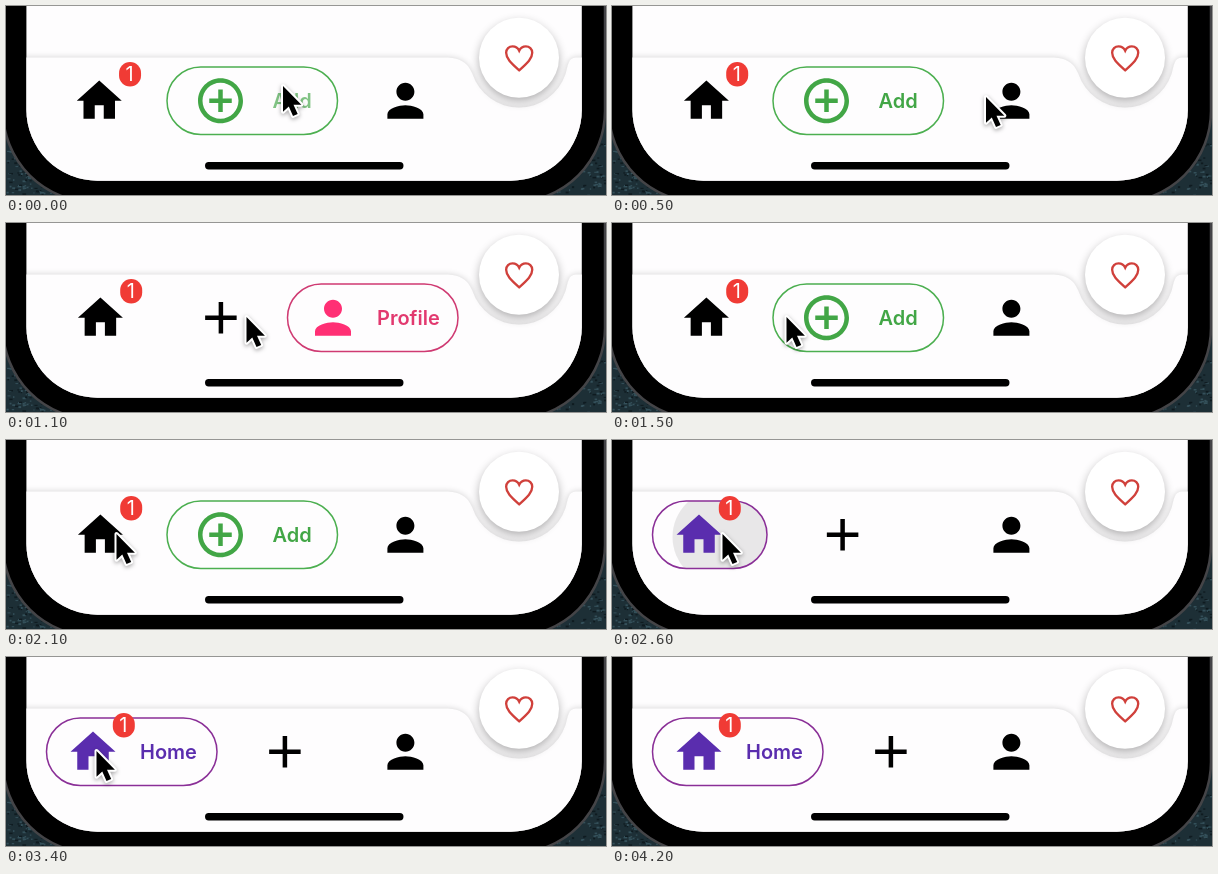
Recreate the animation shown at these times as an HTML page with a canvas. Size 600 px wide and 189 px high, loop 4300 ms.

```html
<!DOCTYPE html>
<html lang="en">
<head>
<meta charset="utf-8">
<title>Bottom navigation</title>
<style>
  html, body { margin: 0; width: 100%; height: 100%; overflow: hidden; background: #000; }
  canvas { display: block; width: 600px; height: 189px; }
</style>
</head>
<body>
<canvas id="stage"></canvas>
<script>
const W = 600, H = 189, LOOP = 4300, STEP = 100;
const canvas = document.getElementById('stage');
const ctx = canvas.getContext('2d');
const dpr = window.devicePixelRatio || 1;
canvas.width = W * dpr;
canvas.height = H * dpr;

// Icons on a 24 unit grid
const icons = {
  home: new Path2D('M10 20v-6h4v6h5v-8h3L12 3 2 12h3v8z'),
  plus: new Path2D('M19 13h-6v6h-2v-6H5v-2h6V5h2v6h6v2z'),
  plusRing: new Path2D('M13 7h-2v4H7v2h4v4h2v-4h4v-2h-4V7zm-1-5C6.48 2 2 6.48 2 12s4.48 10 10 10 10-4.48 10-10S17.52 2 12 2zm0 18c-4.41 0-8-3.59-8-8s3.59-8 8-8 8 3.59 8 8-3.59 8-8 8z'),
  person: new Path2D('M12 12c2.21 0 4-1.79 4-4s-1.79-4-4-4-4 1.79-4 4 1.79 4 4 4zm0 2c-2.67 0-8 1.34-8 4v2h16v-2c0-2.66-5.33-4-8-4z'),
  heart: new Path2D('M12 20.5C6 15.2 3 12.2 3 8.4C3 5.8 5 4 7.4 4C9.4 4 11.1 5.1 12 7C12.9 5.1 14.6 4 16.6 4C19 4 21 5.8 21 8.4C21 12.2 18 15.2 12 20.5Z')
};
const arrow = new Path2D('M0 0V25.8L5.8 20.5L10 30L14.7 28L10.5 18.7H18.4Z');
const boxPath = (x, y, w, h, r) => {
  const p = new Path2D();
  p.roundRect(x, y, w, h, r);
  return p;
};
const screenShape = boxPath(20.4, -200, 555.4, 374.7, 71);
const phoneShape = boxPath(-3, -200, 602, 396, 91);
const barShape = new Path2D('M10 51.5H438C455 51.5 462 57 466.5 68A49 49 0 0 0 559.5 68C562 60 562 51.5 570 51.5H582V200H10Z');

const MID = 94.8, LEFT = 40, NARROW = 107.5, WIDE = 171.5, GAP = 13, REST = 54.4;
const tabs = [
  { label: 'Home', icon: 'home', on: 'home', inset: 47, textAt: 94, line: '#8a2f97', tint: '#5a2dae' },
  { label: 'Add', icon: 'plus', on: 'plusRing', inset: 54, textAt: 106, line: '#4caf50', tint: '#42a646' },
  { label: 'Profile', icon: 'person', on: 'person', inset: 46, textAt: 90, line: '#cf3a72', tint: '#ff2f74', ink: '#e2396f' }
];
// Selections: time, tab, tap point
const taps = [
  { t: -300, tab: 1, x: 272 },
  { t: 650, tab: 2, x: 396 },
  { t: 1150, tab: 1, x: 238 },
  { t: 2450, tab: 0, x: 108 }
];
// Pointer stops: time, x, y
const pointer = [
  [0, 277, 80], [500, 374, 91], [650, 396, 94], [750, 396, 94],
  [1100, 240.5, 94], [1200, 236, 94], [1500, 174.5, 94], [1800, 110.5, 94],
  [2600, 110.5, 94], [3000, 90.5, 94], [3830, 90.5, 94], [3980, 40, 195]
];

const clamp = v => Math.max(0, Math.min(1, v));
const mix = (a, b, k) => a + (b - a) * k;
const smooth = v => v * v * (3 - 2 * v);

function onIconGrid(x, y, scale, paint) {
  ctx.save();
  ctx.translate(x, y);
  ctx.scale(scale, scale);
  ctx.translate(-12, -12);
  paint();
  ctx.restore();
}

function drawIcon(name, x, y, color) {
  onIconGrid(x, y, 2.25, () => {
    ctx.fillStyle = color;
    ctx.fill(icons[name], 'evenodd');
  });
}

function fillShadowed(path, fill, shadow, blur, dy) {
  ctx.save();
  ctx.shadowColor = shadow;
  ctx.shadowBlur = blur * dpr;
  ctx.shadowOffsetY = dy * dpr;
  ctx.fillStyle = fill;
  ctx.fill(path);
  ctx.restore();
}

function drawWallpaper() {
  ctx.fillStyle = '#1d2f36';
  ctx.fillRect(0, 0, W, H);
  let seed = 7;
  const rnd = () => (seed = seed * 16807 % 2147483647) / 2147483647;
  for (let i = 0; i < 260; i++) {
    const x = (rnd() * 100 + 550) % W;
    ctx.fillStyle = rnd() < .5 ? '#0f1b20' : '#34505a';
    ctx.fillRect(x, 135 + rnd() * 54, 1 + rnd() * 3, 1 + rnd());
  }
}

function drawPhone() {
  drawWallpaper();
  ctx.fillStyle = '#000';
  ctx.fill(phoneShape);
  ctx.strokeStyle = '#444447';
  ctx.lineWidth = 2.5;
  ctx.stroke(phoneShape);

  ctx.fillStyle = '#fefdfe';
  ctx.fill(screenShape);
  ctx.save();
  ctx.clip(screenShape);
  fillShadowed(barShape, '#fefdfe', 'rgba(0,0,0,.18)', 6, 0);
  const fab = new Path2D();
  fab.arc(513, 51.7, 40, 0, Math.PI * 2);
  fillShadowed(fab, '#fff', 'rgba(0,0,0,.3)', 10, 4);
  ctx.restore();
  onIconGrid(513.2, 52, 1.45, () => {
    ctx.strokeStyle = '#d0403b';
    ctx.lineWidth = 1.6;
    ctx.stroke(icons.heart);
  });

  ctx.fillStyle = '#000';
  ctx.fill(boxPath(199, 156, 198.5, 7.4, 3.7));
}

function cellsFor(active, before, k) {
  let x = LEFT;
  return tabs.map((_, i) => {
    const from = i === before ? WIDE : NARROW;
    const to = i === active ? WIDE : NARROW;
    const cell = { x, w: mix(from, to, k) };
    x += cell.w + GAP;
    return cell;
  });
}

const restX = (i, active) =>
  cellsFor(active, active, 1)[i].x + (i === active ? tabs[i].inset : REST);

function drawPill(tab, cell, tap, age) {
  const pill = boxPath(cell.x + .5, 61, cell.w - 1, 67.5, 33.75);
  ctx.fillStyle = '#fefdfe';
  ctx.fill(pill);
  ctx.save();
  ctx.clip(pill);
  const ripple = .085 * (1 - clamp((age - 180) / 120));
  if (ripple > 0) {
    ctx.fillStyle = `rgba(0,0,0,${ripple})`;
    ctx.beginPath();
    ctx.arc(tap.x, 97, 10 + age * .25, 0, Math.PI * 2);
    ctx.fill();
  }
  ctx.globalAlpha = clamp((age - 220) / 120);
  ctx.fillStyle = tab.ink || tab.tint;
  ctx.font = '600 20px Inter, sans-serif';
  ctx.textAlign = 'left';
  ctx.fillText(tab.label, cell.x + tab.textAt, 101.6);
  ctx.restore();
  ctx.strokeStyle = tab.line;
  ctx.lineWidth = 1.5;
  ctx.stroke(pill);
}

function drawBadge(x) {
  ctx.fillStyle = '#f03b35';
  ctx.fill(boxPath(x - 11, 56, 22, 24.4, 11));
  ctx.fillStyle = '#fff';
  ctx.font = '400 20px Inter, sans-serif';
  ctx.textAlign = 'center';
  ctx.fillText('1', x - .5, 75.3);
}

function drawTabs(t) {
  const n = taps.filter(p => p.t <= t).length - 1;
  const tap = taps[n];
  const active = tap.tab;
  const before = n ? taps[n - 1].tab : 0;
  const age = t - tap.t;
  const u = clamp(age / 300);
  const cells = cellsFor(active, before, u ** 3);

  drawPill(tabs[active], cells[active], tap, age);
  tabs.forEach((tab, i) => {
    const on = i === active;
    let x;
    if (on) {
      x = cells[i].x + mix(REST, tab.inset, clamp(age / 120));
    } else {
      const k = i === 0 ? smooth(clamp(age / 400)) : u * u;
      x = mix(restX(i, before), restX(i, active), k);
    }
    drawIcon(on ? tab.on : tab.icon, x, MID, on ? tab.tint : '#000');
    if (i === 0) drawBadge(x + 30.8);
  });
}

function drawPointer(t) {
  const i = pointer.findIndex(p => p[0] > t);
  if (i < 1) return;
  const a = pointer[i - 1], b = pointer[i];
  const k = (t - a[0]) / (b[0] - a[0]);
  ctx.save();
  ctx.translate(mix(a[1], b[1], k), mix(a[2], b[2], k));
  ctx.lineJoin = 'round';
  ctx.lineWidth = 4;
  ctx.strokeStyle = '#fff';
  ctx.shadowColor = 'rgba(0,0,0,.35)';
  ctx.shadowBlur = 4 * dpr;
  ctx.shadowOffsetY = 1.5 * dpr;
  ctx.stroke(arrow);
  ctx.shadowColor = 'transparent';
  ctx.fillStyle = '#000';
  ctx.fill(arrow);
  ctx.restore();
}

const start = performance.now();
function render() {
  const elapsed = Math.max(0, performance.now() - start) % LOOP;
  const t = Math.floor(elapsed / STEP) * STEP;
  ctx.setTransform(dpr, 0, 0, dpr, 0, 0);
  drawPhone();
  drawTabs(t);
  drawPointer(t);
  requestAnimationFrame(render);
}
render();
</script>
</body>
</html>
```
